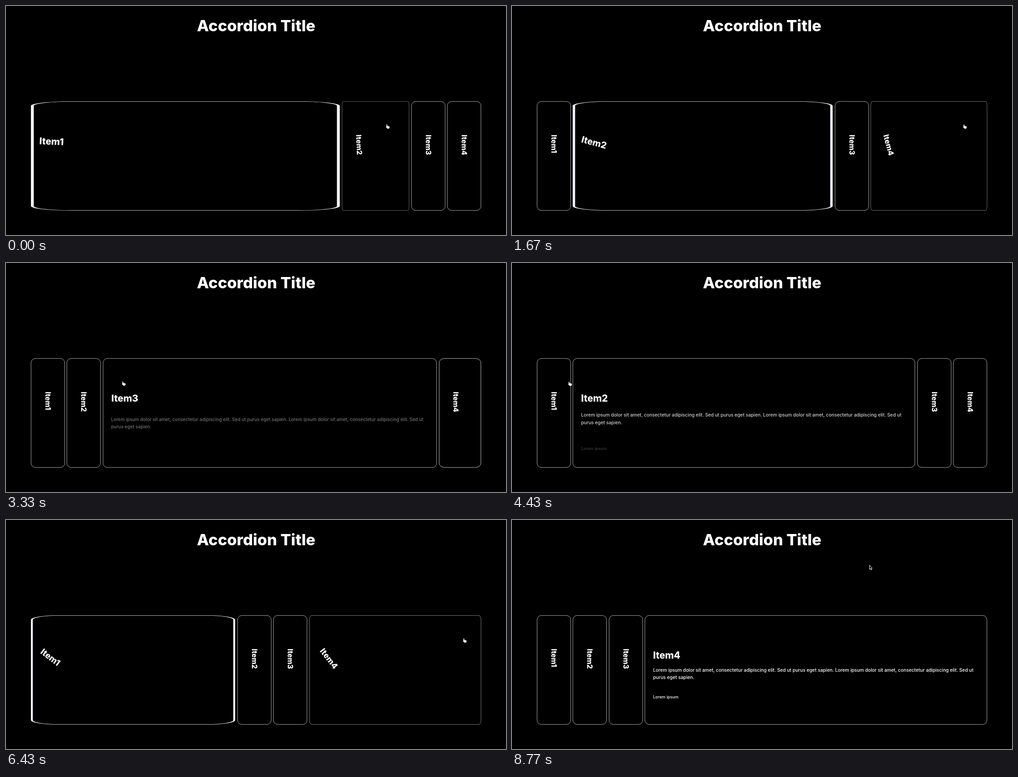
An HTML page with a canvas for the animation above (8.91 s loop, 1104 px wide and 507 px high).

```html
<!DOCTYPE html>
<html lang="en">
<meta charset="utf-8">
<title>Accordion</title>
<style>
  html, body { margin: 0; background: #000; overflow: hidden; }
  canvas { display: block; width: 1104px; height: 507px; }
</style>
<canvas></canvas>
<script>
const canvas = document.querySelector('canvas');
const ctx = canvas.getContext('2d');
const ratio = window.devicePixelRatio || 1;
canvas.width = 1104 * ratio;
canvas.height = 507 * ratio;

const LOOP = 8910, GROW = 700, FADE = 500;
const LEFT = 55, TOP = 211, HEIGHT = 242, RADIUS = 9.6, BORDER = 0.7;
const CLOSED = 74.8, OPEN = 756, GAP = 4.6, PAD = 18.4;
const SENTENCE = 'Lorem ipsum dolor sit amet, consectetur adipiscing elit. ';
const LINES = [SENTENCE + 'Sed ut purus eget sapien. ' + SENTENCE + 'Sed ut', 'purus eget sapien.'];

// Each hover opens an item and leaves the pointer at x, y.
const HOVERS = [
  { at: -75, open: 1, x: 843, y: 267 },
  { at: 1484, open: 3, x: 1000, y: 267 },
  { at: 2650, open: 2, x: 260, y: 267 },
  { at: 3620, open: 1, x: 127, y: 268 },
  { at: 4474, open: 0, x: 218, y: 240 },
  { at: 6118, open: 3, x: 1013, y: 267 },
];
const LEAVE = { at: 8590, x: 791, y: 105 };
const HAND = new Path2D('M-3-4.2Q-2-5.2-1.2-4.2V-1.6L3.2-.6Q4.4 0 4 1.6L3 4.4H-1L-4 1Q-4-.4-3 0Z');
const ARROW = new Path2D('M-1.6-4.8V4.2L.4 2.4 1.8 5.6 3.2 5 1.8 1.9H4.4Z');

const clamp = v => Math.min(1, Math.max(0, v));
const mix = (a, b, k) => a + (b - a) * k;
const easeInOut = v => (1 - Math.cos(Math.PI * clamp(v))) / 2;

// The latest entry reached at time t, and the one before it.
function reached(list, t) {
  const i = list.findLastIndex(entry => entry.at <= t);
  return [list[i], list[i - 1]];
}

function write(text, x, y, font) {
  ctx.font = font + ' Inter, sans-serif';
  ctx.fillText(text, x, y);
}

function fadeUp(k, draw) {
  ctx.save();
  ctx.globalAlpha = k;
  ctx.translate(0, 25 * (1 - k));
  draw();
  ctx.restore();
}

function drawBody(age) {
  fadeUp(easeInOut((age - 450) / FADE), () =>
    LINES.forEach((line, i) => write(line, PAD, 335.7 + i * 16.4, '500 10.27px')));
  fadeUp(easeInOut((age - 650) / FADE), () =>
    write('Lorem ipsum', PAD, 394.8, '500 9.1px'));
}

// Border and body stretch with the item; the heading keeps its shape.
function drawItem(index, x, width, turn, isOpen, age) {
  const left = Math.round(x), full = isOpen ? OPEN : CLOSED;
  ctx.save();
  ctx.translate(left, 0);
  ctx.save();
  ctx.scale((Math.round(x + width) - left) / full, 1);
  ctx.beginPath();
  ctx.roundRect(BORDER / 2, TOP + BORDER / 2, full - BORDER, HEIGHT - BORDER, RADIUS);
  ctx.lineWidth = BORDER;
  ctx.stroke();
  if (isOpen) drawBody(age);
  ctx.restore();

  ctx.translate(CLOSED / 2, 299.2);
  ctx.rotate(turn * Math.PI / 2);
  ctx.scale(1 - turn / 4, 1 - turn / 4);
  write('Item' + (index + 1), PAD - CLOSED / 2, 7.6, '800 20.9px');
  ctx.restore();
}

function drawItems(t) {
  const [hover, last = { open: 0 }] = reached(HOVERS, t);
  const age = t - hover.at, grown = clamp(age / GROW);
  let x = LEFT;
  for (let i = 0; i < 4; i++) {
    const openness = k => mix(+(i === last.open), +(i === hover.open), k);
    const width = mix(CLOSED, OPEN, openness(grown));
    drawItem(i, x, width, 1 - openness(easeInOut(grown)), i === hover.open, age);
    x += width + GAP;
  }
}

function drawPointer(t) {
  const [stop, last = stop] = reached([...HOVERS, LEAVE], t + 60);
  const k = easeInOut((t + 60 - stop.at) / 240);
  const y = mix(last.y, stop.y, k);
  ctx.save();
  ctx.translate(mix(last.x, stop.x, k), y);
  if (y > TOP) ctx.fill(HAND);
  else ctx.stroke(ARROW);
  ctx.restore();
}

function draw(t) {
  ctx.setTransform(ratio, 0, 0, ratio, 0, 0);
  ctx.clearRect(0, 0, 1104, 507);
  ctx.fillStyle = '#fff';
  ctx.strokeStyle = '#f4f2fa';
  ctx.textAlign = 'center';
  write('Accordion Title', 552.3, 56, '800 34.6px');
  ctx.textAlign = 'left';
  drawItems(t);
  drawPointer(t);
}

function frame() {
  draw(performance.now() % LOOP);
  requestAnimationFrame(frame);
}
frame();
</script>
</html>
```
